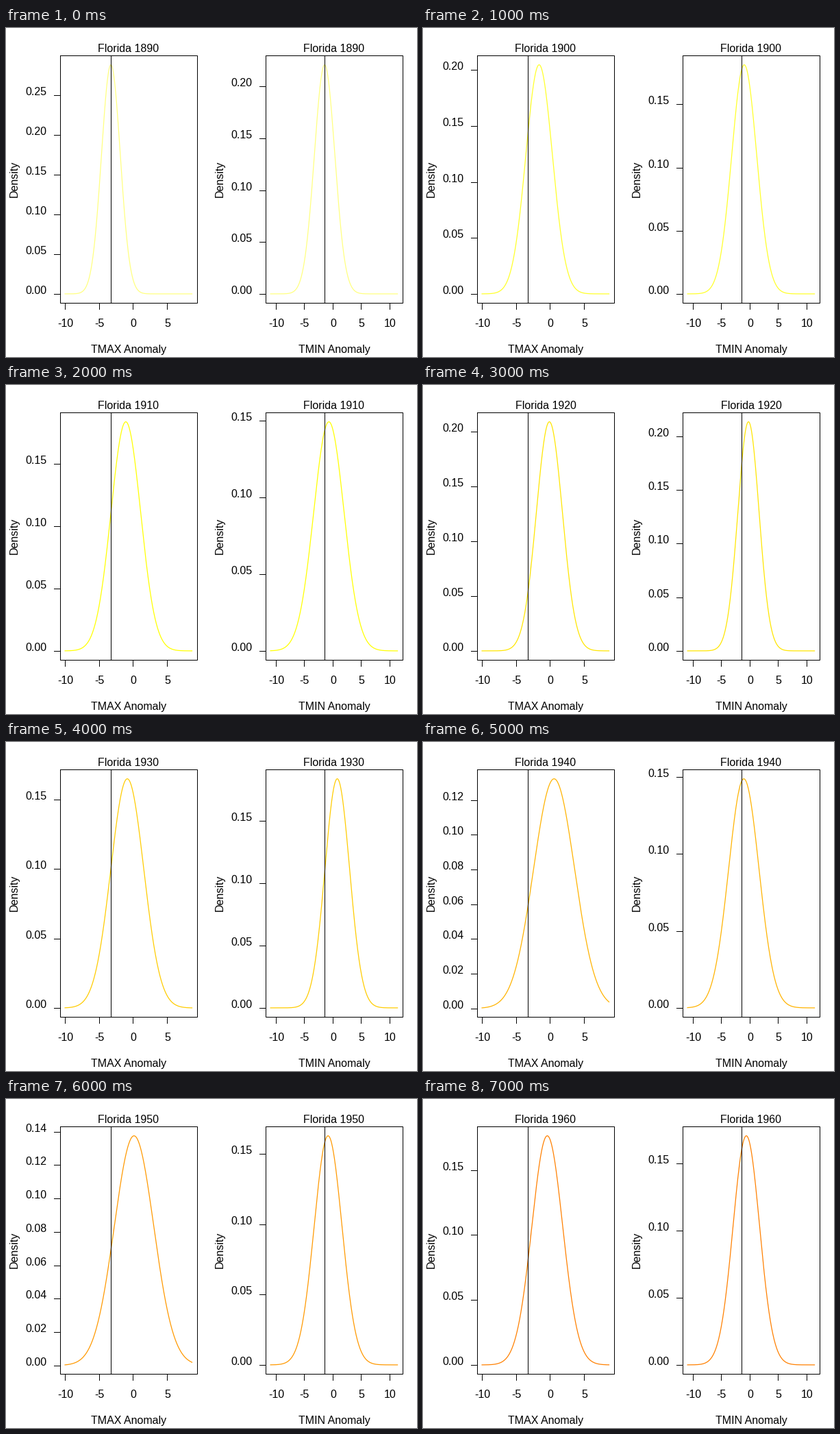
These frames come from a looping animation (600x480 px, 8000 ms). A matplotlib script:

```python
import matplotlib.pyplot as plt
import numpy as np
from matplotlib.animation import FuncAnimation

W, H, DPI = 600, 480, 100
PX = 72 / DPI                       # one pixel in points
BOX = (79, 279, 40, 401)            # left, right, top, bottom of a panel
Y_LOW, Y_HIGH = 387.9, 53.7         # pixel rows of the curve's min and max
PAD = 0.04

plt.rcParams["font.family"] = "Liberation Sans"

# name, shift, x of zero, pixels per unit, data range, ticks, reference value
PANELS = [
    ("TMAX", 0, 185.4, 9.93, (-10.0, 8.67), (-10, -5, 0, 5), -3.25),
    ("TMIN", 300, 476.8, 8.28, (-10.95, 11.44), (-10, -5, 0, 5, 10), -1.41),
]

# decade: (mean, sd) per panel, then the line colour
DECADES = [
    (1890, (-3.25, 1.385), (-1.41, 1.805), "#ffff80"),
    (1900, (-1.60, 1.950), (-0.95, 2.200), "#ffff2a"),
    (1910, (-1.06, 2.175), (-0.66, 2.675), "#ffff00"),
    (1920, (-0.09, 1.909), (-0.20, 1.870), "#ffe600"),
    (1930, (-0.84, 2.422), (0.82, 2.175), "#ffcc00"),
    (1940, (0.60, 3.018), (-1.02, 2.680), "#ffb300"),
    (1950, (0.15, 2.900), (-0.80, 2.450), "#ff9900"),
    (1960, (-0.40, 2.263), (-0.58, 2.335), "#ff8000"),
]

fig = plt.figure(figsize=(W / DPI, H / DPI), dpi=DPI, facecolor="white")
ax = fig.add_axes([0, 0, 1, 1])


def rule(xs, ys):
    """Black one-pixel line; whole coordinates name the pixel it fills."""
    ax.plot(xs, ys, color="black", lw=PX, snap=True, zorder=3,
            solid_joinstyle="miter", solid_capstyle="projecting")


def label(x, y, s, ha="center", **kw):
    ax.text(x, y, s, size=16 * PX, ha=ha, va="baseline", **kw)


def density(x, mean, sd):
    return np.exp(-0.5 * ((x - mean) / sd) ** 2) / (sd * np.sqrt(2 * np.pi))


def draw_panel(panel, year, stats, color):
    name, shift, zero, unit, span, ticks, ref = panel
    left, right, top, bottom = BOX
    left, right = left + shift, right + shift
    mid = (left + right) / 2

    x = np.linspace(*span, 400)
    y = density(x, *stats)
    low, high = y.min(), y.max()
    scale = (Y_LOW - Y_HIGH) / (high - low)

    def col(v):
        return zero + unit * v

    def row(v):
        return Y_LOW - (v - low) * scale

    ax.plot(col(x), row(y), color=color, lw=1.25 * PX, zorder=2)
    ref_x = round(col(ref))
    rule([ref_x, ref_x], [top, bottom])
    rule([left, right, right, left, left], [top, top, bottom, bottom, top])

    for t in ticks:
        tx = round(col(t))
        rule([tx, tx], [bottom, bottom + 9])
        label(tx + 0.5, 436, str(t))

    reach = (high - low) * (1 + 2 * PAD)
    step = 0.05 if reach > 0.16 else 0.02
    for v in np.arange(0, high + PAD * (high - low), step):
        ty = round(row(v))
        rule([left - 9, left], [ty, ty])
        label(shift + 59.5, ty, f"{v:.2f}", ha="right")

    label(mid, 35, f"Florida {year}")
    label(mid, 474, f"{name} Anomaly")
    label(shift + 17, 220, "Density", rotation=90, rotation_mode="anchor")


def draw(i):
    ax.clear()
    ax.set_axis_off()
    ax.set_xlim(0, W)
    ax.set_ylim(H, 0)
    year, *stats, color = DECADES[i]
    for panel, s in zip(PANELS, stats):
        draw_panel(panel, year, s, color)
    return []


anim = FuncAnimation(fig, draw, frames=len(DECADES), interval=1000,
                     repeat=True, repeat_delay=0)
plt.show()
```
